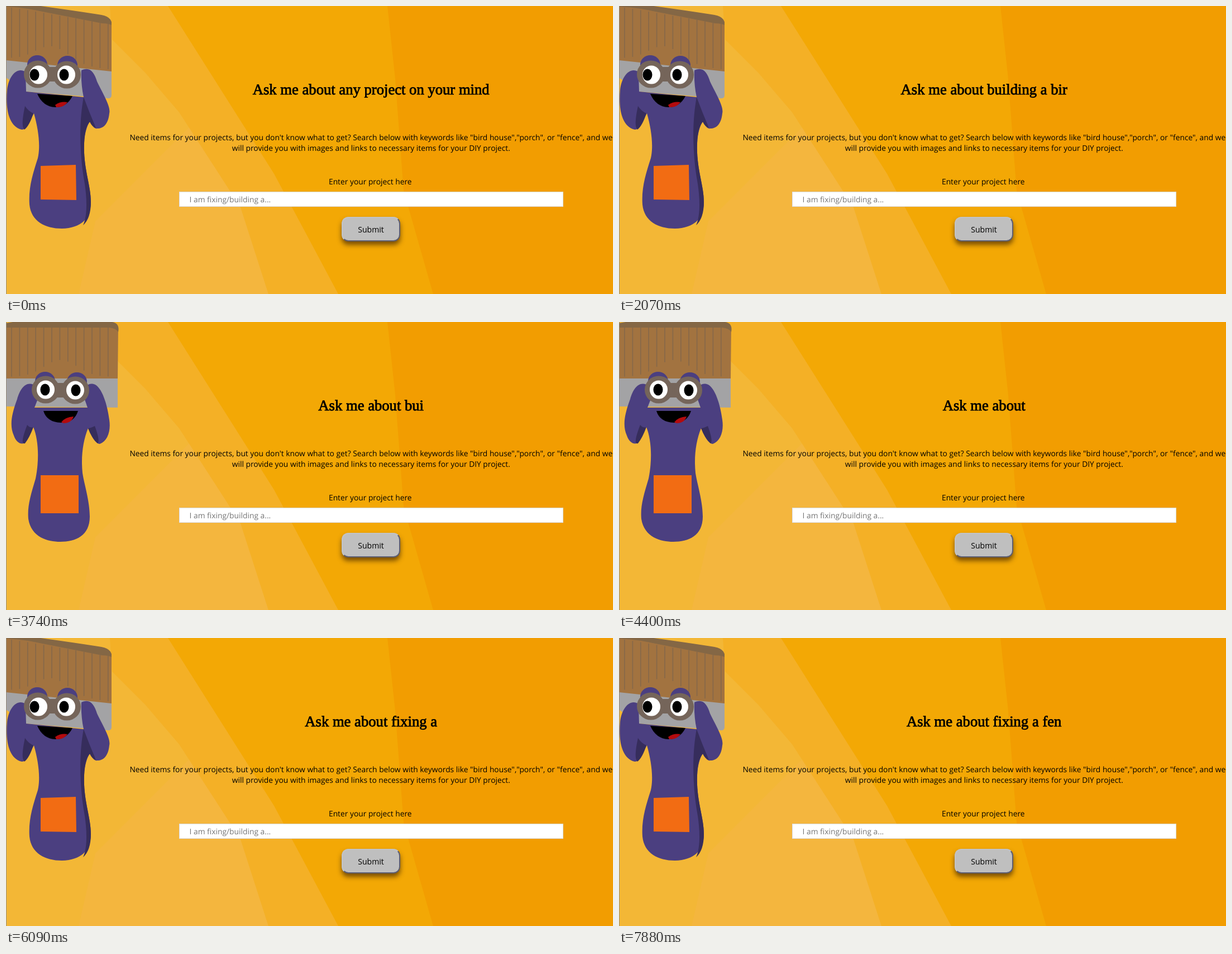
These frames come from a looping animation (1087 by 515 pixels, 8000 ms). An HTML page:

```html
<!DOCTYPE html>
<html lang="en">
<head>
<meta charset="utf-8">
<title>Project helper</title>
<style>
html, body { margin: 0; width: 100%; height: 100%; overflow: hidden; background: #f3b736; }
svg { position: absolute; left: 0; top: 0; display: block; }
text { font: 13.8px "Open Sans", sans-serif; text-anchor: middle; text-rendering: geometricPrecision; }
#title { font: 26.65px "Liberation Serif", serif; stroke: #000; stroke-width: .8px; }
.hint { fill: #757575; text-anchor: start; }
.btn {
  position: absolute; left: 601px; top: 377px; width: 105px; height: 44px; box-sizing: border-box;
  border: 2px solid; border-color: #c3c3c5 #5d5d70 #5d5d70 #c3c3c5; border-radius: 12px;
  background: #bfbfbf; box-shadow: 0 6px 8px rgba(80, 48, 0, .75);
  font: 14px/41px "Open Sans", sans-serif; text-align: center; color: #000;
}
.body { fill: #4b3f80; }
.dark { fill: #362d5c; }
.wood { fill: #a27340; }
.cap { fill: #846745; }
.metal { fill: #a3a3a5; }
.rim { fill: #75655a; }
.tongue { fill: #b30b0e; }
.badge { fill: #f26c13; }
.bristle { stroke: #85684a; stroke-width: 1.6; fill: none; }
</style>
</head>
<body>
<svg width="1087" height="515" viewBox="0 0 1087 515">
  <rect width="1087" height="515" fill="#f3b736"/>
  <path fill="#f4b63e" d="M160 385 L330 215 L420 360 L470 515 H130Z"/>
  <path fill="#f4b026" d="M186 0 L190 60 L250 120 L310 190 L420 360 L470 515 H1087 V0Z"/>
  <path fill="#f3a805" d="M290 0 L480 300 L595 515 H1087 V0Z"/>
  <path fill="#f29d01" d="M683 0 L697 130 L712 330 L765 515 H1087 V0Z"/>
  <g id="mascot"></g>
  <rect width="1" height="515" fill="#99917f"/>
  <text id="title" x="653.7" y="158"></text>
  <text x="653.8" y="240">Need items for your projects, but you don't know what to get? Search below with keywords like "bird house","porch", or "fence", and we</text>
  <text x="653.8" y="259">will provide you with images and links to necessary items for your DIY project.</text>
  <text x="652.3" y="319">Enter your project here</text>
  <rect x="310.5" y="332.5" width="687" height="26" fill="#fff" stroke="#dadde9"/>
  <text class="hint" x="328.6" y="351">I am fixing/building a...</text>
</svg>
<div class="btn">Submit</div>
<script>
const LOOP = 8000;

// Each pose: flat shapes plus eye positions and the slope of the bristles.
const poses = {
  right: {
    wood: "M0 0 L40 4 L189 28 V118 L0 98Z",
    cap: "M0 0 H62 Q120 8 165 15 Q191 18 189 34 Q183 31 172 31 L40 5 Q20 2 0 1Z",
    metal: "M0 97 L189 117 V159 Q189 166 182 165 L35 153 L0 128Z",
    body: "M35 118 C20 108 5 125 2 150 C-1 185 5 215 28 221 C38 222 42 205 50 192 C58 220 62 250 57 272 C48 300 40 325 42 355 C45 385 70 398 100 398 C135 397 152 380 152 350 C152 320 138 290 140 245 C141 225 146 212 150 207 C155 215 158 220 164 219 C174 219 183 212 185 192 C188 180 175 160 163 135 C158 118 150 108 135 115 Q134 140 139 163 L36 153Z",
    dark: ["M34 179 Q40 188 49 192 Q42 214 33 221 Q26 215 34 179Z",
           "M139 163 Q149 190 161 218 Q154 216 150 207 Q141 218 140 245 C138 290 152 320 152 350 Q152 380 138 392 C146 375 145 345 141 318 C132 270 130 210 139 163Z"],
    mouth: "M56 157 L119 161 Q109 181 88 181 Q66 180 56 157Z",
    tongue: "M88 177 Q98 170 110 172 Q103 182 90 181Z",
    badge: "M62 286 L125 284 L126 347 L62 346Z",
    eyes: [[57, 122, 58, 123, 51], [109, 123, 108, 123, 104]],
    brow: [[56, 105], [110, 106]],
    lines: [1, .17, 93, .11, 82]
  },
  left: {
    wood: "M0 30 L100 15 L188 4 V97 L0 116Z",
    cap: "M0 19 Q70 5 140 0 H189 V9 Q184 6 172 7 Q90 15 0 32Z",
    metal: "M0 115 L188 96 V143 Q188 150 180 151 L150 153 L45 161 L0 160Z",
    body: "M50 113 C38 106 28 118 22 135 C10 160 -3 180 1 200 C5 215 12 221 20 219 C27 217 30 211 34 207 C46 225 47 250 42 290 C32 325 28 360 36 378 C45 395 70 398 92 397 C130 395 143 378 142 350 C141 320 125 290 126 245 C126 220 130 203 136 192 C140 205 145 219 155 221 C168 221 175 216 180 200 C184 180 184 150 178 130 C172 115 160 111 151 118 L149 153 L47 161Z",
    dark: ["M45 184 Q36 201 34 207 C46 225 47 250 42 290 C32 325 28 360 36 378 Q40 386 47 391 C39 370 39 335 43 310 C52 270 48 220 45 184Z",
           "M150 179 Q144 188 136 192 Q141 213 154 221 Q155 204 150 179Z"],
    mouth: "M65 161 L127 156 Q121 179 98 179 Q75 181 65 161Z",
    tongue: "M75 171 Q88 169 97 178 Q88 183 80 180Z",
    badge: "M60 282 L125 284 V346 L59 346Z",
    eyes: [[75, 122, 75, 124, 79], [127, 122, 126, 123, 134]],
    brow: [[74, 105], [130, 105]],
    lines: [29, -.14, 112, -.1, 100]
  },
  front: {
    wood: "M0 8 H201 L200 102 H0Z",
    cap: "M0 2 L12 0 H190 Q204 2 201 18 Q197 11 185 10 H0Z",
    metal: "M0 101 H200 V153 L0 151Z",
    body: "M49 112 C35 106 25 120 20 138 C10 165 6 185 14 203 C18 215 26 219 32 217 C40 208 43 196 49 188 C58 210 60 245 53 280 C44 310 38 330 40 352 C45 385 75 393 97 393 C125 393 150 382 150 348 C150 320 140 290 137 270 C134 240 138 212 147 190 C152 200 158 217 168 218 C182 213 188 195 185 175 C182 150 172 115 157 111 C148 109 142 113 138 130 L146 153 H51 L60 130Z",
    dark: ["M38 184 Q43 190 49 188 Q42 207 34 217 Q24 220 38 184Z",
           "M159 186 Q151 190 147 190 Q153 207 164 217 Q169 213 159 186Z"],
    mouth: "M67 159 H129 Q122 181 98 180 Q73 179 67 159Z",
    tongue: "M99 179 Q106 170 121 169 Q117 181 103 181Z",
    badge: "M62 274 H130 V342 H62Z",
    eyes: [[71, 121, 71, 121, 70], [124, 122, 124, 122, 125]],
    brow: [[70, 106], [127, 107]],
    lines: [10, 0, 98, 0, 98]
  }
};

const path = (cls, d) => `<path class="${cls}" d="${d}"/>`;
const oval = (attr, x, y, rx, ry) => `<ellipse ${attr} cx="${x}" cy="${y}" rx="${rx}" ry="${ry}"/>`;

function bristles([top, topSlope, end, endSlope, mid]) {
  let d = "";
  for (let x = 10; x < 188; x += 14.4) {
    const lift = 30 * Math.exp(-(((x - mid) / 42) ** 2));
    d += `M${x} ${top + topSlope * x}V${end + endSlope * x - lift}`;
  }
  return path("bristle", d);
}

function drawPose(name, p) {
  const [a, b] = p.eyes;
  const bridge = `M${a[0]} 109 H${b[0]} V135 H${a[0]}Z`;
  return `<g id="${name}">` +
    path("wood", p.wood) + bristles(p.lines) + path("cap", p.cap) + path("metal", p.metal) +
    path("body", p.body) + p.dark.map(d => path("dark", d)).join("") +
    p.brow.map(([x, y]) => oval('class="body"', x, y, 18, 17)).join("") +
    path("rim", bridge) +
    p.eyes.map(([x, y]) => oval('class="rim"', x, y, 25, 24.5)).join("") +
    p.eyes.map(([, , x, y, px]) =>
      oval('fill="#fff"', x, y, 16, 16.5) + oval('fill="#000"', px, y, 8.5, 10.5)).join("") +
    path("", p.mouth) + path("tongue", p.tongue) + path("badge", p.badge) + "</g>";
}

const mascot = document.getElementById("mascot");
mascot.innerHTML = Object.entries(poses).map(([n, p]) => drawPose(n, p)).join("");
const groups = [...mascot.children];
const title = document.getElementById("title");

const poseSteps = [
  [0, "right"], [510, "front"], [990, "left"], [1570, "front"],
  [1950, "right"], [2430, "front"], [2910, "left"], [3440, "front"],
  [3970, "right"], [4400, "front"], [4880, "left"], [5440, "front"],
  [5950, "right"], [6360, "front"], [6930, "left"], [7470, "front"], [7880, "right"]
];

// Typed and erased one letter at a time: phrase with its letter count.
const bird = "building a bird house", fence = "fixing a fence";
const textSteps = [[0, "any project on your mind"], [150, bird]];
const type = (word, count, step, times) =>
  times.forEach((t, i) => textSteps.push([t, word.slice(0, count + step * i)]));
type(bird, 20, -1, [1140, 1290, 1430, 1570, 1710, 1860, 2070, 2190, 2310, 2430, 2580,
  2730, 2870, 3020, 3170, 3440, 3570, 3700, 3840, 3970, 4100]);
type(fence, 1, 1, [5030, 5170, 5440, 5560, 5690, 5830, 5980, 6090, 6230, 6360, 6570,
  6780, 6930, 7050]);
type(fence, 13, -1, [7740, 7880]);

const at = (steps, t) => steps.findLast(s => s[0] <= t)[1];

function render(t) {
  const pose = at(poseSteps, t);
  groups.forEach(g => { g.style.display = g.id === pose ? "" : "none"; });
  const line = ("Ask me about " + at(textSteps, t)).trim();
  if (title.textContent !== line) title.textContent = line;
}

const start = performance.now();
function tick() {
  render((performance.now() - start) % LOOP);
  requestAnimationFrame(tick);
}
tick();
</script>
</body>
</html>
```
